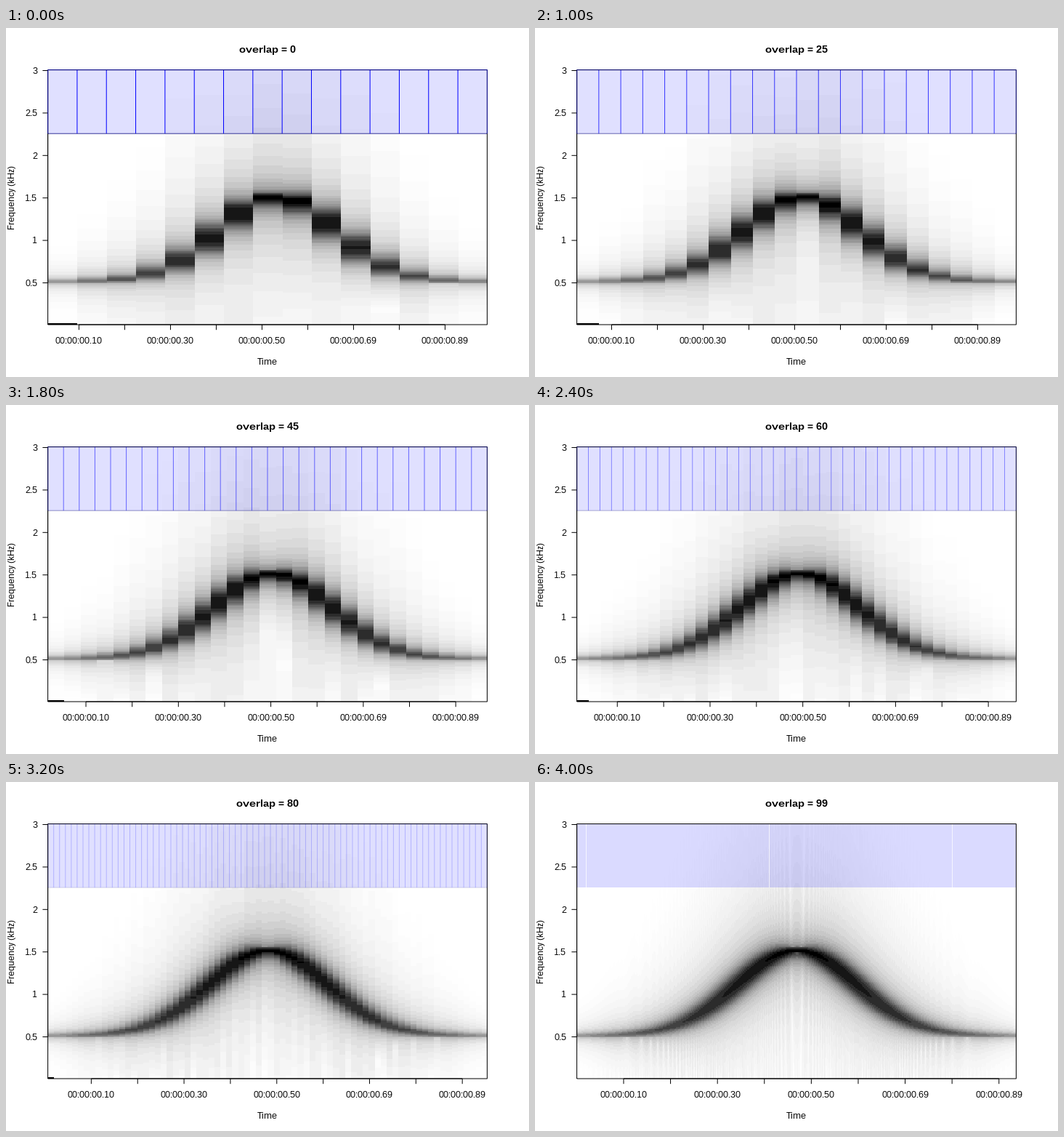
Animation of 720x480 px, one loop 6000 ms. Source, as a matplotlib script:

```python
import numpy as np
import matplotlib.pyplot as plt
from matplotlib.animation import FuncAnimation
from matplotlib.patches import Rectangle

W, H, DPI = 720, 480, 80
PT = 72 / DPI                              # points per pixel
L, R, T, B = 57.6, 662.4, 57.6, 408.0      # plot box
STRIP = T + (B - T) / 4                    # lower edge of the blue strip
RATE, WL = 8000, 512
BIN = RATE / WL / 1000                     # kHz per bin
BINS = 192
STEP_DB, LEVELS = 120 / 18, 25

plt.rcParams["font.family"] = "Liberation Sans"
plt.rcParams["text.hinting"] = "native"
plt.rcParams["text.hinting_factor"] = 1    # whole-pixel glyph advances

# Tone whose pitch and loudness both follow one bell curve
t = np.arange(RATE) / RATE
bell = np.exp(-0.5 * ((t - 0.5) * 8) ** 2)
signal = bell * np.sin(2 * np.pi * np.cumsum(500 + 1000 * bell) / RATE)

fig = plt.figure(figsize=(W / DPI, H / DPI), dpi=DPI, facecolor="white")
ax = fig.add_axes([0, 0, 1, 1])


def y_of(khz):
    return B - (B - T) * (khz - BIN / 2) / 3


def shades(hop):
    """Stepped grey spectrogram, one column per window."""
    count = int((RATE - WL - 1) / hop) + 1
    starts = (np.arange(count) * hop).astype(int)
    chunks = signal[starts[:, None] + np.arange(WL)] * np.hanning(WL)
    amp = np.abs(np.fft.rfft(chunks, axis=1))[:, :BINS].T
    db = 20 * np.log10(amp / amp.max() + 1e-12)
    level = np.clip(np.floor(-db / STEP_DB), 0, LEVELS)
    level[0, 0] = 0
    return 1 - (1 - level / LEVELS) ** 2.3


def line(x, y, color="black", **kw):
    ax.plot(x, y, color=color, lw=PT, snap=False, solid_capstyle="butt",
            solid_joinstyle="miter", **kw)


def label(x, y, s, size=12, ha="center", **kw):
    ax.text(x, y, s, fontsize=size * PT, ha=ha, va="baseline", **kw)


def draw_windows(overlap):
    """Blue strip of analysis windows, outlined more faintly as they overlap."""
    dense = overlap == 99
    ax.add_patch(Rectangle((L, T), R - L, STRIP - T, fc="blue", lw=0,
                           alpha=0.145 if dense else 0.122, zorder=2))
    if dense:
        for x in (70.5, 322.5, 574.5):
            line([x, x], [T, STRIP], "white", alpha=0.75, zorder=3)
        return
    alpha = 1 - overlap / 100
    count = int(np.ceil(1500 / (100 - overlap)))
    edges = np.linspace(L, R, count + 1)[1:-1]
    ax.vlines(edges, T, STRIP, colors="blue", lw=PT, alpha=alpha,
              snap=False, zorder=3)
    line([L, R], [STRIP, STRIP], (0.2, 0.2, 0.6), alpha=alpha, zorder=3)
    line([L, L, R, R], [STRIP, T, T, STRIP], "blue", alpha=0.55 * alpha,
         zorder=5)


def draw_axes(hop, count):
    line([L, R, R, L, L], [B, B, T, T, B], zorder=4)

    for khz in np.arange(0.5, 3.1, 0.5):
        y = y_of(khz)
        line([L - 7.2, L], [y, y], zorder=4)
        label(L - 14.4, y + 4.3, f"{khz:g}", ha="right")
    line([L, L], [y_of(0.5), y_of(3)], zorder=4)

    step = hop / RATE
    scale = (R - L) / (count * step)
    ticks = L + (np.arange(1, 11) / 10 - step / 2) * scale
    ticks = ticks[ticks < R]
    for x in ticks:
        line([x, x], [B, B + 7.2], zorder=4)
    for x, cents in zip(ticks[::2], (10, 30, 50, 69, 89)):
        label(x, 434, f"00:00:00.{cents}")
    line(ticks[[0, -1]], [B, B], zorder=4)

    label(360, 463, "Time")
    label(12, 233, "Frequency (kHz)", rotation=90, rotation_mode="anchor")


def draw(i):
    overlap = min(5 * i, 99)
    hop = WL * (100 - overlap) / 100
    grey = shades(hop)

    ax.clear()
    ax.axis("off")
    ax.imshow(grey, cmap="gray", vmin=0, vmax=1, origin="lower",
              aspect="auto", interpolation="nearest", zorder=1,
              extent=(L, R, B, T))
    ax.set_xlim(0, W)
    ax.set_ylim(H, 0)

    draw_windows(overlap)
    draw_axes(hop, grey.shape[1])
    label(360, 34, f"overlap = {overlap}", 14.4, fontweight="bold")
    return []


anim = FuncAnimation(fig, draw, frames=30, init_func=lambda: [], interval=200,
                     repeat=True, repeat_delay=0, blit=False)
plt.show()
```
